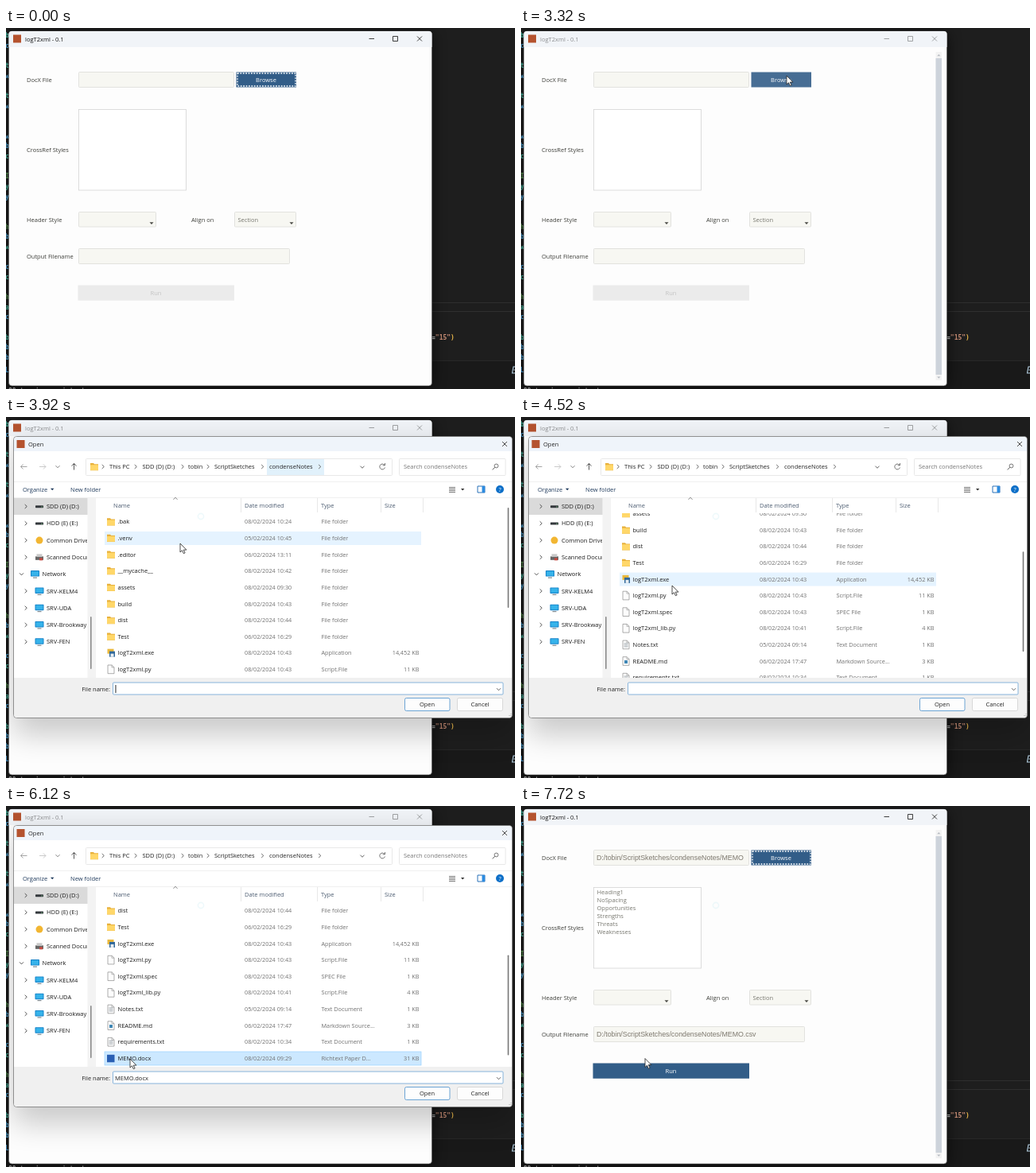
An HTML page that plays this animation: 640 by 454 pixels, repeating every 8000 ms.

```html
<!DOCTYPE html>
<html lang="en">
<head>
<meta charset="utf-8">
<title>File picker demo</title>
<style>
html, body { margin: 0; width: 100%; height: 100%; overflow: hidden; background: #1e1e1e; }
svg { display: block; width: 100vw; height: 100vh; }
text { font: 7.5px "Open Sans", "Noto Sans", sans-serif; white-space: pre; }
.small { font-size: 7.3px; }
.entry { font: 8.8px "Liberation Sans", sans-serif; }
.code { font: bold 8px "DejaVu Sans Mono", monospace; }
</style>
</head>
<body>
<svg id="stage" viewBox="0 0 640 454"></svg>
<script>
const LOOP = 8000, ROW = 20.62, FIRST_ROW = 131.7, SCROLL = 6 * ROW;
const APP = 'logT2xml', PROJECT = 'condenseNotes', FILE = 'MEMO';
const HOME = `D:/tobin/ScriptSketches/${PROJECT}/${FILE}`;

// Text is placed by the middle of its line.
const text = (x, y, str, fill = '#3e3f3a', extra = '') =>
  `<text x="${x}" y="${y + 2.7}" fill="${fill}" ${extra}>${str}</text>`;
const rect = (x, y, w, h, fill, extra = '') =>
  `<rect x="${x}" y="${y}" width="${w}" height="${h}" fill="${fill}" ${extra}/>`;
const line = (d, stroke, width = 1, extra = '') =>
  `<path d="${d}" fill="none" stroke="${stroke}" stroke-width="${width}" ${extra}/>`;
const shape = (d, fill) => `<path d="${d}" fill="${fill}"/>`;
const group = (id, body, extra = '') => `<g id="${id}" ${extra}>${body}</g>`;
const box = (x, y, w, h, fill, stroke, r = 1) =>
  rect(x + .5, y + .5, w - 1, h - 1, fill, `stroke="${stroke}" stroke-width=".8" rx="${r}"`);
const cross = (x, y, r, color) =>
  line(`M${x - r} ${y - r}l${2 * r} ${2 * r}m0 ${-2 * r}l${-2 * r} ${2 * r}`, color, .8);
const chevron = (x, y, color = '#555', angle = 0) =>
  line('M-1.3-2.5L1.3 0L-1.3 2.5', color, .9, `transform="translate(${x} ${y}) rotate(${angle})"`);
const middle = 'text-anchor="middle"';

const icons = {
  folder: (x, y) => shape(`M${x - 5} ${y - 4.5}h4l1.2 1.3h4.8v8h-10z`, '#e8b13c') +
    rect(x - 5, y - 2.3, 10, 6.8, '#ffd769', 'rx=".7"'),
  page: (x, y) => `<path d="M${x - 4} ${y - 5.3}h5.2l2.8 2.8v7.9h-8z" fill="#fcfcfc" stroke="#8c8c8c" stroke-width=".7"/>` +
    line(`M${x + 1} ${y - 5.2}v2.8h3`, '#8c8c8c', .6),
  lines: (x, y) => icons.page(x, y) + line(`M${x - 2.5} ${y - 1.5}h5m-5 2h5m-5 2h5`, '#8d969e', .8),
  note: (x, y) => icons.page(x, y) + rect(x - 2, y - 1, 4, 4, '#3f87b5'),
  program: (x, y) => rect(x - 4.5, y - 5, 8, 6, '#e9b83c') + rect(x - 2, y - 2, 7, 7, '#31699b') +
    rect(x - .5, y + 1, 4, 4, '#e9eef2'),
  blueSquare: (x, y) => rect(x - 5, y - 4.5, 9.5, 9.5, '#2a5fb4'),
  drive: (x, y) => rect(x - 5, y - 1.3, 10, 3, '#34383c', 'rx=".6"') + rect(x + 2.5, y, 1.3, 1, '#7fd08a'),
  circle: (x, y) => `<circle cx="${x}" cy="${y}" r="4.5" fill="#f2b632"/>`,
  scanner: (x, y) => rect(x - 5, y - 1, 10, 4.5, '#666') + rect(x - 3.5, y - 4, 7, 3.5, '#c9c9c9') + rect(x, y + 1, 4, 3, '#c64a42'),
  monitor: (x, y) => rect(x - 5.5, y - 4.5, 11, 7.5, '#1683c9', 'rx=".7"') +
    rect(x - 4.5, y - 3.5, 9, 5.5, '#36b3ea') + rect(x - 2.5, y + 4, 5, 1, '#66747d'),
};

function editor() {
  const codeLetters = 'bc tw tw  wbc Iyy  hbw cc hac bbb';
  const letters = [...codeLetters].map((c, i) =>
    text(-1, 9.5 + i * 12.65, c, 'hI'.includes(c) ? '#5f9d58' : i % 3 ? '#58b8f0' : '#4ec9b0', 'class="code"')).join('');
  return rect(0, 0, 640, 454, '#1e1e1e') + rect(0, 418, 640, 36, '#191919') + letters +
    line('M535 345.5H640M535 356.5H640', '#343434', .8) + line('M535 418.5H640', '#2b2b2b', .8) +
    `<text x="535" y="391.7" class="code" fill="#d4d4d4">=<tspan fill="#ce9178">"15"</tspan><tspan fill="#e8b64a">)</tspan></text>` +
    text(-1, 430, 'L', '#4ea1d8', 'class="code"') +
    line('M641 426h-3l-1.5 8h5M638.5 430h2', '#b9d5e8', 1.1) +
    text(3, 456, '00 tension assistant', '#b8b8b8', 'class="code"');
}

function titleBar() {
  return shape('M3.5 24V8q0-4 4-4H531.5q4 0 4 4V24z', '#f1f4f8') + rect(9, 8.5, 10, 10, '#b5532f') +
    group('caption', text(24, 14, APP + ' - 0.1', '#111') + line('M456.5 13.5h6.5', '#111', .8) +
      line('M486.5 10.5h6v6h-6z', '#111', .8) + cross(520, 13.5, 3, '#111'));
}

function combo(x, w, label) {
  return box(x, 231, w, 19.5, '#f7f7f2', '#dcdcd9') + text(x + 4.5, 241, label, '#77776f') +
    shape(`M${x + w - 8.5} 244.2h5l-2.5 2.7z`, '#4a4a45');
}

function mainWindow() {
  const styles = ['Heading1', 'NoSpacing', 'Opportunities', 'Strengths', 'Threats', 'Weaknesses'];
  const labels = [[26, 65, 'DocX File'], [26, 153, 'CrossRef Styles'], [26, 241, 'Header Style'],
    [233, 241, 'Align on'], [26, 287, 'Output Filename']];
  return rect(3, 6, 533, 446, '#000', 'rx="5" filter="url(#blur)" opacity=".6"') +
    rect(3.5, 4, 532, 446, '#fdfdfd', 'rx="4" stroke="#555" stroke-width=".6"') + titleBar() +
    labels.map(l => text(...l)).join('') +
    box(91, 55, 196, 20, '#f7f7f2', '#dcdcd9') +
    rect(289.5, 55.5, 75.5, 19, '#325d88', 'id="browse"') + text(327, 65, 'Browse', '#fff', middle) +
    group('focus', line('M291 57H364V73H291z', '#fff', 1.3, 'stroke-dasharray="1.8 1.6"')) +
    box(91, 102, 136, 102.5, '#fff', '#d4d4d4', 0) +
    combo(91, 98, '') + combo(287, 78, 'Section') +
    box(91, 277, 266, 20, '#f7f7f2', '#dcdcd9') +
    rect(90.5, 323.5, 196.5, 19.2, '#ebebeb') + text(188.5, 333, 'Run', '#c4c4c4', middle) +
    group('filled',
      text(95, 65.5, HOME, '#7d786e', 'class="entry" clip-path="url(#entryClip)"') +
      text(95, 287.5, HOME + '.csv', '#7d786e', 'class="entry"') +
      styles.map((s, i) => text(95.5, 108.5 + i * 10, s, '#77776f')).join('') +
      rect(90.5, 323.5, 196.5, 19.2, '#325d88') + text(188.5, 333, 'Run', '#fff', middle)) +
    group('scrollbar', rect(521.5, 30, 7.5, 413, '#f3f3f3') + rect(521.5, 38, 7.5, 398, '#cdd3db') +
      shape('M523.3 35.2h4l-2-2.2zM523.3 438.5h4l-2 2.2z', '#b5bac0'));
}

const D = (day, time) => `0${day}/02/2024 ${time}`;
const FOLDER = 'File folder', SCRIPT = 'Script.File', PLAIN = 'Text Document';
const files = [
  ['folder', '.bak', D(8, '10:24'), FOLDER], ['folder', '.venv', D(5, '10:45'), FOLDER],
  ['folder', '.editor', D(6, '13:11'), FOLDER], ['folder', '__mycache__', D(8, '10:42'), FOLDER],
  ['folder', 'assets', D(8, '09:30'), FOLDER], ['folder', 'build', D(8, '10:43'), FOLDER],
  ['folder', 'dist', D(8, '10:44'), FOLDER], ['folder', 'Test', D(6, '16:29'), FOLDER],
  ['program', APP + '.exe', D(8, '10:43'), 'Application', '14,452 KB'],
  ['page', APP + '.py', D(8, '10:43'), SCRIPT, '11 KB'],
  ['page', APP + '.spec', D(8, '10:43'), 'SPEC File', '1 KB'],
  ['page', APP + '_lib.py', D(8, '10:41'), SCRIPT, '4 KB'],
  ['lines', 'Notes.txt', D(5, '09:14'), PLAIN, '1 KB'],
  ['note', 'README.md', D(6, '17:47'), 'Markdown Source...', '3 KB'],
  ['lines', 'requirements.txt', D(8, '10:34'), PLAIN, '1 KB'],
  ['blueSquare', FILE + '.docx', D(8, '09:29'), 'Richtext Paper D...', '31 KB'],
];

function fileRow([icon, name, date, type, size = ''], i) {
  const y = FIRST_ROW + i * ROW, grey = '#707070';
  return icons[icon](132, y) + text(140.5, y, name, '#1d1d1d') + text(300, y, date, grey, 'class="small"') +
    text(396.5, y, type, grey, 'class="small"') + text(519.5, y, size, grey, 'class="small" text-anchor="end"');
}

function navigation() {
  const crumbs = [[130, 'This PC', 163], [171.5, 'SDD (D) (D:)', 222], [229, 'tobin', 254],
    [262, 'ScriptSketches', 322.5], [331, PROJECT, 394.5]];
  return line('M26.5 62.5h-8m3-3l-3 3l3 3', '#9a9a9a', .9) + line('M42 62.5h8m-3-3l3 3l-3 3', '#c4c4c4', .9) +
    chevron(65, 62.5, '#777', 90) + line('M85.5 66.5v-8m-3 3l3-3l3 3', '#444', .9) +
    box(100, 52, 386, 22, '#fff', '#e2e2e2') +
    rect(328, 53, 72, 20, '#e1f1fb', 'id="crumb"') + icons.folder(111, 62.5) + chevron(122, 62.5) +
    crumbs.map(([x, name, end]) => text(x, 62.5, name, '#222') + chevron(end, 62.5)).join('') +
    chevron(448, 63, '#555', 90) +
    line('M476 60.5a3.4 3.4 0 1 0 .5 3M476.5 58v2.8h-2.8', '#555', .8) +
    box(494, 52, 134.5, 22, '#fff', '#e2e2e2') + text(500, 62.5, 'Search ' + PROJECT, '#757575') +
    '<circle cx="616.5" cy="61.5" r="2.4" fill="none" stroke="#555" stroke-width=".8"/>' +
    line('M614.8 63.2l-3.2 3.2', '#555', .9) +
    text(21, 91, 'Organize', '#1e395b') + shape('M56 89.8h4.4l-2.2 2.4z', '#1e395b') + text(81, 91, 'New folder', '#1e395b') +
    line('M557 88.5h8m-8 2h8m-8 2h8m-8 2h8', '#555', .8) + shape('M572 90h4.4l-2.2 2.4z', '#333') +
    line('M593 87h9v8h-9z', '#2871b8', 1) + rect(598.5, 87, 3.5, 8, '#2c8be0') +
    '<circle cx="621" cy="91" r="5" fill="#0d6fc8"/>' + text(621, 91, '?', '#fff', middle + ' font-weight="bold"');
}

function tree() {
  const nodes = [['drive', 'SDD (D) (D:)'], ['drive', 'HDD (E) (E:)'], ['circle', 'Common Drive ('],
    ['scanner', 'Scanned Documents'], ['monitor', 'Network'], ['monitor', 'SRV-KELM4'], ['monitor', 'SRV-UDA'],
    ['monitor', 'SRV-Brookway'], ['monitor', 'SRV-FEN']];
  const rows = nodes.map(([icon, name], i) => {
    const y = 112.5 + i * 21.28, root = name === 'Network', shift = root ? -5.5 : 0;
    return chevron(25 + shift, y, '#444', root ? 90 : 0) + icons[icon](42 + shift, y) + text(51 + shift, y, name, '#1d1d1d');
  }).join('');
  return rect(102.5, 102, 10.5, 226, '#f3f3f3') + rect(10, 102, 92.5, 21, '#dadada') +
    `<g clip-path="url(#treeClip)">${rows}</g>` + rect(106, 251, 1.6, 66, '#8b8b8b', 'rx=".8"');
}

function dialog() {
  const columns = [[135, 'Name'], [300, 'Date modified'], [396, 'Type'], [476, 'Size']];
  const back = rect(9, 34, 628, 366, '#000', 'rx="5" filter="url(#softBlur)" opacity=".2"') +
    rect(9.5, 24.5, 627, 354, '#fff', 'rx="4" stroke="#777" stroke-width=".8"') +
    shape('M10 43V29q0-4 4-4H632q4 0 4 4V43z', '#eff4fa') +
    rect(13.5, 29, 10, 10, '#b5532f') + text(28, 34, 'Open', '#222') + cross(627, 34, 3, '#222') +
    line('M10 81.5H636M10 101.5H636', '#ededed', .8) + navigation() + tree() +
    line('M295.5 102v18M391.5 102v18M471.5 102v18M524.5 102v18', '#e2e2e2', .8) +
    chevron(213, 102.5, '#777', -90) + columns.map(([x, name]) => text(x, 111, name, '#4b5b70')).join('');
  const list = `<g clip-path="url(#listClip)">` +
    group('rows', rect(124, -8.3, 398, 17, '#e5f3ff', 'id="hover"') + files.map(fileRow).join('')) + '</g>' +
    rect(630.7, 114, 1.6, 126, '#777', 'rx=".8" id="thumb"');
  const footer = shape('M10 328H636V374q0 4-4 4H14q-4 0-4-4z', '#f0f0f0') +
    text(131, 342, 'File name:', '#222', 'text-anchor="end"') + box(134, 333.5, 491.5, 16, '#fff', '#6ba3d3') +
    chevron(619.5, 342.5, '#555', 90) + rect(137.5, 337, .9, 10, '#111', 'id="caret"') +
    group('chosen', text(137, 342, FILE + '.docx', '#222')) +
    box(501, 353, 57.5, 17, '#fdfdfd', '#4a90cc', 2) + text(529.5, 361.5, 'Open', '#222', middle) +
    box(567, 353, 58, 17, '#fdfdfd', '#d0d0d0', 2) + text(596, 361.5, 'Cancel', '#222', middle) +
    line('M635 373v1m0 1v1m-2-1v1', '#aaa', 1);
  return back + list + footer;
}

const clip = (id, ...area) => `<clipPath id="${id}">${rect(...area, '#000')}</clipPath>`;
const blur = (id, size) =>
  `<filter id="${id}" x="-15%" y="-15%" width="130%" height="130%"><feGaussianBlur stdDeviation="${size}"/></filter>`;
const stage = document.getElementById('stage');
stage.innerHTML = '<defs>' + blur('blur', 9) + blur('softBlur', 18) +
  clip('entryClip', 92, 56, 192, 18) + clip('treeClip', 10, 102, 92, 225) + clip('listClip', 113, 121, 515, 207) + '</defs>' +
  editor() + mainWindow() + group('dialog', dialog()) +
  group('ring', '<circle cx="245" cy="125" r="3.6" fill="none" stroke="#d9f2f7" stroke-width="1.6"/>') +
  group('cursor', '<path d="M0 0V11l2.5-2.3 1.8 4 1.8-.8-1.8-3.8h3.6z" fill="#fff" stroke="#222" stroke-width=".8"/>');

const part = Object.fromEntries([...stage.querySelectorAll('[id]')].map(e => [e.id, e]));
const show = (id, on) => { part[id].style.display = on ? '' : 'none'; };
const progress = (t, from, to) => Math.min(1, Math.max(0, (t - from) / (to - from)));
const between = (t, from, to) => t >= from && t < to;

const path = [[2120, 252, 281], [2520, 296, 150], [3080, 296, 150], [3320, 334, 60], [3480, 334, 60],
  [3680, 245, 125], [3760, 245, 125], [3920, 219, 159], [4120, 190, 212], [4960, 190, 212],
  [5320, 157, 305], [5600, 156, 318], [7700, 156, 318], [7720, 156, 317.5]];

function pointerAt(t) {
  const next = path.findIndex(p => p[0] > t);
  if (next < 1) return (next ? path[path.length - 1] : path[0]).slice(1);
  const [a, b] = [path[next - 1], path[next]];
  const p = progress(t, a[0], b[0]), ease = p * p * (3 - 2 * p);
  return [a[1] + (b[1] - a[1]) * ease, a[2] + (b[2] - a[2]) * ease];
}

function draw(t) {
  const [x, y] = pointerAt(t);
  show('cursor', t >= 2120);
  part.cursor.setAttribute('transform', `translate(${x} ${y})`);

  const active = t < 80 || t >= 6320;
  part.caption.setAttribute('opacity', active ? 1 : t < 280 ? .6 : .45);
  show('focus', t < 280 || t >= 6320);
  show('scrollbar', between(t, 2120, 3480) || t >= 7720);
  show('filled', t >= 6440);
  const overBrowse = between(t, 3080, 3560) && x > 289 && y > 55 && y < 75;
  part.browse.setAttribute('fill', overBrowse ? '#476d94' : '#325d88');

  const opened = progress(t, 3480, 3680) * (1 - progress(t, 6240, 6400));
  const scale = .92 + .08 * opened;
  show('dialog', opened > 0);
  part.dialog.setAttribute('opacity', opened);
  part.dialog.setAttribute('transform', `translate(323 201) scale(${scale}) translate(-323 -201)`);
  show('crumb', t < 4000);
  show('ring', t >= 3680);
  part.ring.setAttribute('opacity', t < 3840 ? 1 : .45);

  const scrolled = t < 4320 ? 0 : Math.min(4, 1 + Math.floor((t - 4320) / 93)) / 4;
  const offset = scrolled * SCROLL;
  part.rows.setAttribute('transform', `translate(0 ${-offset})`);
  part.thumb.setAttribute('y', 114 + 73.5 * scrolled);
  const row = Math.round((y - FIRST_ROW + offset) / ROW), selected = t >= 6040;
  show('hover', t >= 3760);
  part.hover.setAttribute('transform', `translate(0 ${FIRST_ROW + row * ROW})`);
  part.hover.setAttribute('fill', selected ? '#cce8ff' : '#e5f3ff');
  part.hover.setAttribute('stroke', selected ? '#99d1ff' : 'none');
  part.hover.setAttribute('stroke-width', .7);
  show('caret', between(t, 3560, 4080) || between(t, 4560, 5040) || between(t, 5600, 6040));
  show('chosen', selected);
}

function tick() {
  draw(performance.now() % LOOP);
  requestAnimationFrame(tick);
}
tick();
</script>
</body>
</html>
```
